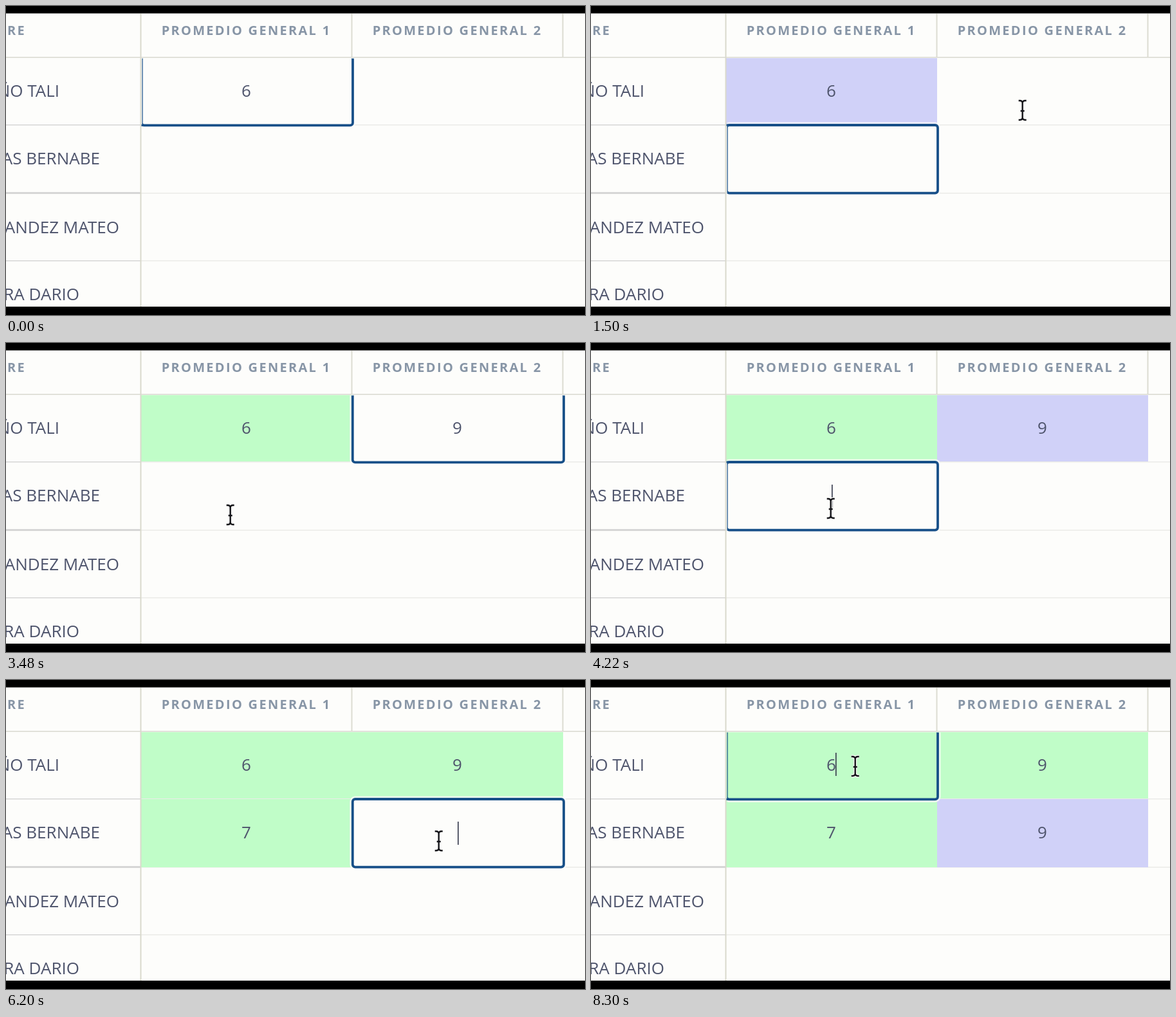
These frames come from a looping animation (900 px wide and 480 px high, 8320 ms). An HTML page with a canvas:

```html
<!DOCTYPE html>
<html lang="es">
<head>
<meta charset="utf-8">
<style>
html, body { margin: 0; width: 100%; height: 100%; overflow: hidden; background: #000; }
canvas { display: block; }
</style>
</head>
<body>
<canvas id="stage" width="900" height="480"></canvas>
<script>
const ctx = document.getElementById('stage').getContext('2d');
const LOOP = 8320;
const PAPER = '#fdfdfb', LAVENDER = '#d0d1f8', GREEN = '#c0fdc8';
const INK = '#4e546c', LABEL = '#8795a6', FOCUS = '#174f88';
const COLS = [210, 538, 866], ROWS = [81, 185, 291, 396];
const NAMES = [['ÑO TALI', 83, 141], ['AS BERNABE', 146, 246], ['LANDEZ MATEO', 176, 353], ['ERA DARIO', 114, 457]];

// Each value is shown from its time on; saving follows leaving the cell.
const CELLS = [
  { col: 0, row: 0, digit: 6, typed: 0, left: 600, saved: 2750 },
  { col: 1, row: 0, digit: 9, typed: 2850, left: 3720, saved: 4700 },
  { col: 0, row: 1, digit: 7, typed: 4600, left: 5720, saved: 6150 },
  { col: 1, row: 1, digit: 9, typed: 6750, left: 7900, saved: Infinity }
];

// Focus changes: time, column, row.
const FOCUSES = [[0, 0, 0], [600, 0, 1], [1700, 1, 0], [3720, 0, 1], [5720, 1, 1], [7900, 0, 0]];

// Pointer stops: time, x, y. It is hidden while typing.
const POINTER = [
  [680, 430, 205], [920, 644, 162], [1500, 670, 162], [3080, 670, 162],
  [3480, 348, 267], [3720, 372, 257], [4850, 372, 257], [5040, 404, 254],
  [5600, 672, 250], [7250, 672, 250], [7800, 410, 134], [LOOP, 410, 134]
];
const HIDDEN = [[0, 680], [2850, 3080], [4600, 4850], [6750, 7250]];

function rect(color, x, y, w, h) {
  ctx.fillStyle = color;
  ctx.fillRect(x, y, w, h);
}

function outline(path, color, width) {
  ctx.strokeStyle = color;
  ctx.lineWidth = width;
  ctx.stroke(path);
}

function text(str, x, y, align, color, font, spacing = 0) {
  ctx.font = font + ' "Open Sans", "Noto Sans", sans-serif';
  ctx.letterSpacing = spacing + 'px';
  ctx.textAlign = align;
  ctx.fillStyle = color;
  ctx.fillText(str, x, y);
}

const body = (str, x, y, align) => text(str, x, y, align, INK, '26px');
const header = (str, x, align) => text(str, x, 45, align, LABEL, 'bold 20px', 2.3);

function drawGrid() {
  rect(PAPER, 0, 11.5, 900, 456);
  header('RE', 31, 'right');
  for (const i of [0, 1]) header('PROMEDIO GENERAL ' + (i + 1), COLS[i] + 163.5, 'center');
  for (const [name, x, y] of NAMES) body(name, x, y, 'right');
  ROWS.slice(1).forEach((y, i) => {
    rect('#ebebe8', 210, y - 1, 690, 1.5);
    rect('#d6d6d6', 0, y - (i === 1 ? 2 : 1), 210, i === 1 ? 3 : 1.5);
  });
}

function drawCells(t) {
  for (const c of CELLS)
    if (t >= c.left)
      rect(t >= c.saved ? GREEN : LAVENDER, COLS[c.col], ROWS[c.row], 328, c.row ? 106 : 103);
  rect('#d9d9cc', 208.5, 12, 2, 455);
  for (const x of COLS.slice(1)) rect('#dcdcd2', x - 1.5, 12, 2, 68);
  rect('#d9d9d0', 0, 79, 900, 1.5);
}

function drawFocus(t) {
  const [start, col, row] = FOCUSES.filter(f => f[0] <= t).pop();
  const x = COLS[col];
  const cell = CELLS.find(c => c.col === col && c.row === row);
  const filled = t >= cell.typed;
  const box = new Path2D();
  box.roundRect(x + 0.8, row ? 185 : 78.5, 328.2, row ? 105.6 : 106.9, 4);

  // The sticky header and name column cover the edges of the box.
  ctx.save();
  ctx.beginPath();
  ctx.rect(211.5, 81.5, 689, 386);
  ctx.clip();
  outline(box, 'rgba(253, 253, 251, 0.75)', 9);
  ctx.fillStyle = filled && t >= cell.saved ? GREEN : PAPER;
  ctx.fill(box);
  outline(box, FOCUS, 3.8);
  ctx.restore();
  if (!col) rect(FOCUS, 210.5, row ? 183.5 : 183.8, 2, 3);

  const since = t - (filled && cell.typed > start ? cell.typed : start);
  if (start > 0 && since % 1060 < 530) {
    const top = (row ? 218 : 113) + (filled ? 0 : 2);
    rect('#33384a', x + (filled ? 170 : 164), top, 1.6, 36);
  }
}

function drawDigits(t) {
  for (const c of CELLS)
    if (t >= c.typed) body(String(c.digit), COLS[c.col] + 163.5, NAMES[c.row][2], 'center');
}

function drawPointer(t) {
  if (HIDDEN.some(([a, b]) => t >= a && t < b)) return;
  const i = POINTER.findIndex(p => p[0] > t);
  const [t0, x0, y0] = POINTER[i - 1], [t1, x1, y1] = POINTER[i];
  const u = (t - t0) / (t1 - t0), e = u * u * (3 - 2 * u);
  ctx.save();
  ctx.translate(x0 + (x1 - x0) * e + 0.7, y0 + (y1 - y0) * e);
  const beam = new Path2D('M-6-15h2q4 0 4 4v22q0 4-4 4h-2M6-15h-2q-4 0-4 4M6 15h-2q-4 0-4-4M-3 1h6');
  outline(beam, '#fafaf6', 5);
  outline(beam, '#15151a', 2.4);
  ctx.restore();
}

function draw(now) {
  const t = now % LOOP;
  rect('#000', 0, 0, 900, 480);
  drawGrid();
  drawCells(t);
  drawFocus(t);
  drawDigits(t);
  drawPointer(t);
  rect('#000', 0, 467, 900, 13);
}

const begin = performance.now();
function tick() {
  draw(performance.now() - begin);
  requestAnimationFrame(tick);
}
tick();
</script>
</body>
</html>
```
